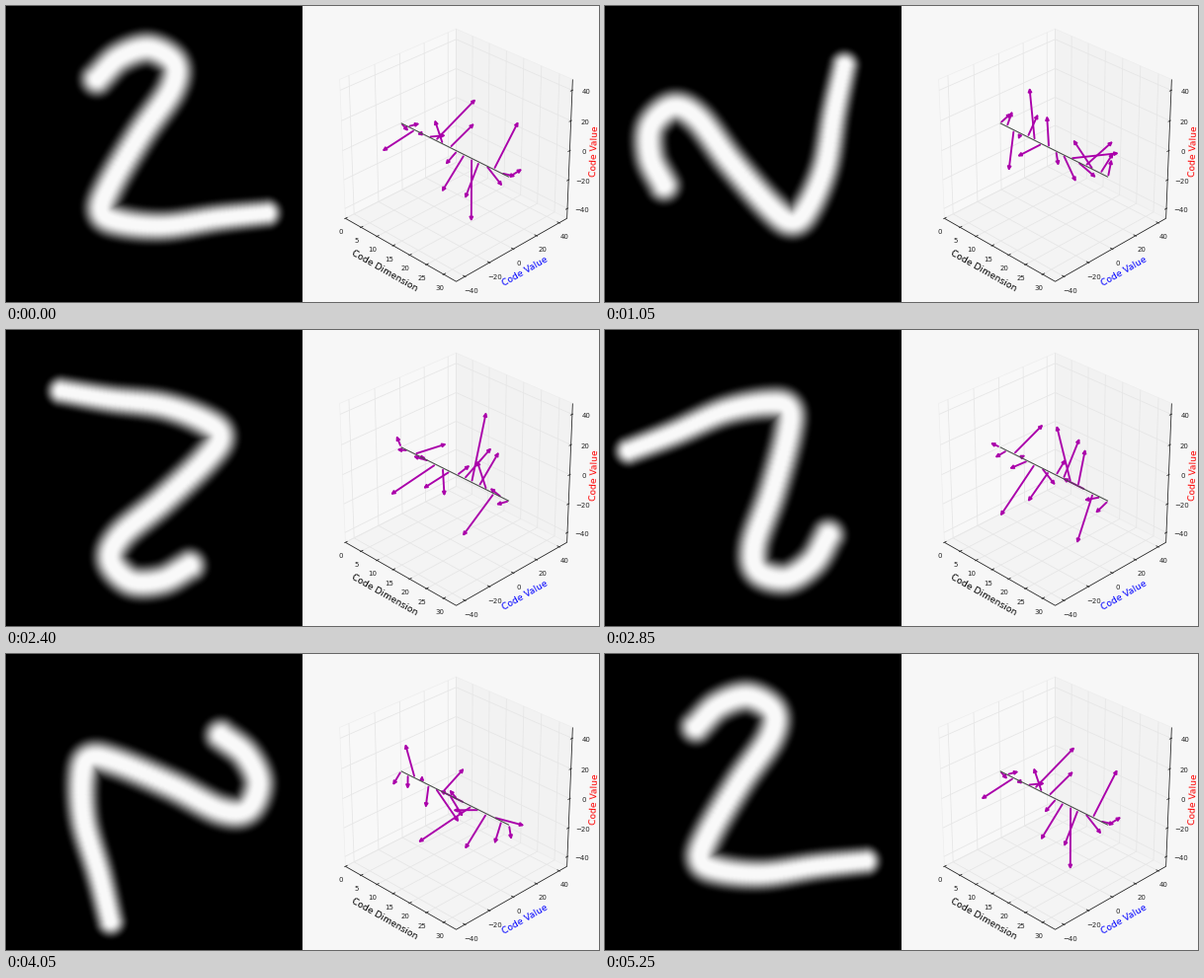
A matplotlib script for the animation above (5.4 s loop, 600x300 px).

```python
import numpy as np
import matplotlib.pyplot as plt
from matplotlib.animation import FuncAnimation
from matplotlib.patches import FancyArrowPatch, Polygon

W, H, DPI = 600, 300, 100
PX = 72 / DPI                      # one pixel in points
FRAMES, STEP = 36, 150
X_MAX, V_MAX = 33.6, 47.0          # axis limits: 0..X_MAX and +-V_MAX
PURPLE = "#aa00aa"
plt.rcParams["font.family"] = "DejaVu Sans"

fig = plt.figure(figsize=(W / DPI, H / DPI), dpi=DPI, facecolor="#f7f7f7")
ax = fig.add_axes([0, 0, 1, 1])


# ---------- 3D box ----------
def project(x, y, z):
    """Perspective view of the data box, 30 degrees up, from -45 degrees."""
    a, b, c = x / X_MAX - 0.5, y / (2 * V_MAX), z / (2 * V_MAX)
    s, ce, se = np.sqrt(0.5), np.cos(np.pi / 6), 0.5
    right = s * (a + b)
    up = s * se * (b - a) + ce * c
    depth = s * ce * (a - b) + se * c
    k = 162.5 / (1 - depth / 10)
    return 455.5 + k * right, 146.6 - k * up


def line(*pts, color="#222222", width=0.8, z=3):
    xy = np.array([project(*p) for p in pts])
    ax.plot(xy[:, 0], xy[:, 1], color=color, lw=width * PX, zorder=z,
            solid_capstyle="butt")


def pane(color, *pts):
    ax.add_patch(Polygon([project(*p) for p in pts], fc=color, ec="#ededed",
                         lw=0.6 * PX, zorder=1))


def tick_text(point, dx, dy, value):
    x, y = project(*point)
    ax.text(x + dx, y + dy, str(value).replace("-", "\u2212"), fontsize=5,
            ha="center", va="center", color="#222222")


def draw_box():
    m, v = X_MAX, V_MAX
    pane("#f8f8f8", (0, -v, -v), (0, v, -v), (0, v, v), (0, -v, v))
    pane("#f2f2f2", (0, v, -v), (m, v, -v), (m, v, v), (0, v, v))
    pane("#f4f4f4", (0, -v, -v), (m, -v, -v), (m, v, -v), (0, v, -v))

    grid = dict(color="#e6e6e6", width=0.8, z=2)
    out, inn = 0.009, 0.018
    for t in range(0, 31, 5):
        line((t, -v, -v), (t, v, -v), (t, v, v), **grid)
        line((t, -v * (1 + 2 * out), -v), (t, -v * (1 - 2 * inn), -v))
        tick_text((t, -v, -v), -4.2, 14, t)
    for t in range(-40, 41, 20):
        line((m, t, -v), (0, t, -v), (0, t, v), **grid)
        line((0, -v, t), (0, v, t), (m, v, t), **grid)
        line((m * (1 + out), t, -v), (m * (1 - inn), t, -v))
        line((m, v * (1 + 2 * out), t), (m, v * (1 - 2 * inn), t))
        tick_text((m, t, -v), 5.8, 14.5, t)
        tick_text((m, v, t), 14.5, 1.8, t)

    line((0, -v, -v), (m, -v, -v), (m, v, -v), (m, v, v))
    line((0, 0, 0), (32, 0, 0), color="#4a4f4a", width=1.1, z=6)

    label = dict(fontsize=6.6, ha="center", va="center")
    ax.text(383, 269, "Code Dimension", color="k", rotation=-29.7, **label)
    ax.text(525.5, 269.5, "Code Value", color="b", rotation=29.7, **label)
    ax.text(595.5, 147, "Code Value", color="r", rotation=87.6, **label)


# ---------- handwritten digit ----------
PEN = np.array([(92, 74), (115, 52), (145, 43), (170, 58), (167, 85),
                (136, 130), (105, 182), (97, 208), (115, 219), (160, 223),
                (215, 215), (264, 210)], float) - 150


def smooth(p, n=12):
    """Catmull-Rom curve through the points."""
    q = np.vstack([2 * p[0] - p[1], p, 2 * p[-1] - p[-2]])
    t = np.linspace(0, 1, n, endpoint=False)[:, None]
    parts = []
    for a, b, c, d in zip(q, q[1:], q[2:], q[3:]):
        parts.append(0.5 * (2 * b + (c - a) * t
                            + (2 * a - 5 * b + 4 * c - d) * t**2
                            + (3 * b - a - 3 * c + d) * t**3))
    return np.vstack(parts + [p[-1:]])


STROKE = smooth(PEN)
RADIUS = np.interp(np.linspace(0, 1, len(STROKE)), [0, 0.7, 1], [24, 24, 20])
GRID = np.arange(1, 300, 2) - 150.0


def digit(theta):
    """Soft brush along the stroke, turned counter-clockwise by theta."""
    c, s = np.cos(theta), np.sin(theta)
    px = STROKE[:, 0] * c + STROKE[:, 1] * s
    py = STROKE[:, 1] * c - STROKE[:, 0] * s
    dx2 = ((GRID[:, None] - px) / RADIUS) ** 2
    dy2 = ((GRID[:, None] - py) / RADIUS) ** 2
    d = np.sqrt((dy2[:, None, :] + dx2[None, :, :]).min(axis=2))
    u = np.clip((1 - d) / 0.87, 0, 1)
    return 0.975 * u * u * (3 - 2 * u)


# ---------- code vectors: each keeps its length and turns with the digit ----
LENGTH = np.array([10, 10, 27, 4, 15, 37, 20, 22,
                   11, 25.5, 43.5, 23, 24, 31, 14, 11])
PHASE = np.radians([-53, -10, -172, 165, -18, 24, 109, 22,
                    208, 223, -90, 240, -55, 50, -31, 4])
DIMS = np.linspace(0, 32, len(LENGTH))


# ---------- scene ----------
image = ax.imshow(digit(0), cmap="gray", vmin=0, vmax=1,
                  extent=(0, 300, 300, 0), interpolation="bilinear", zorder=1)
draw_box()
arrows = []
for d in DIMS:
    arrow = FancyArrowPatch(project(d, 0, 0), project(d, 8, 0),
                            arrowstyle="-|>", mutation_scale=5,
                            lw=1.9 * PX, color=PURPLE,
                            shrinkA=1.4, shrinkB=0, zorder=5)
    arrows.append(ax.add_patch(arrow))

ax.set_aspect("auto")
ax.set_xlim(0, W)
ax.set_ylim(H, 0)
ax.axis("off")


def update(i):
    theta = 2 * np.pi * i / (FRAMES - 1)
    image.set_data(digit(theta))
    tips = LENGTH * np.exp(1j * (PHASE + theta))
    for arrow, d, tip in zip(arrows, DIMS, tips):
        arrow.set_positions(project(d, 0, 0), project(d, tip.real, tip.imag))
    return [image, *arrows]


anim = FuncAnimation(fig, update, frames=FRAMES, interval=STEP,
                     repeat=True, repeat_delay=0, blit=False)
plt.show()
```
